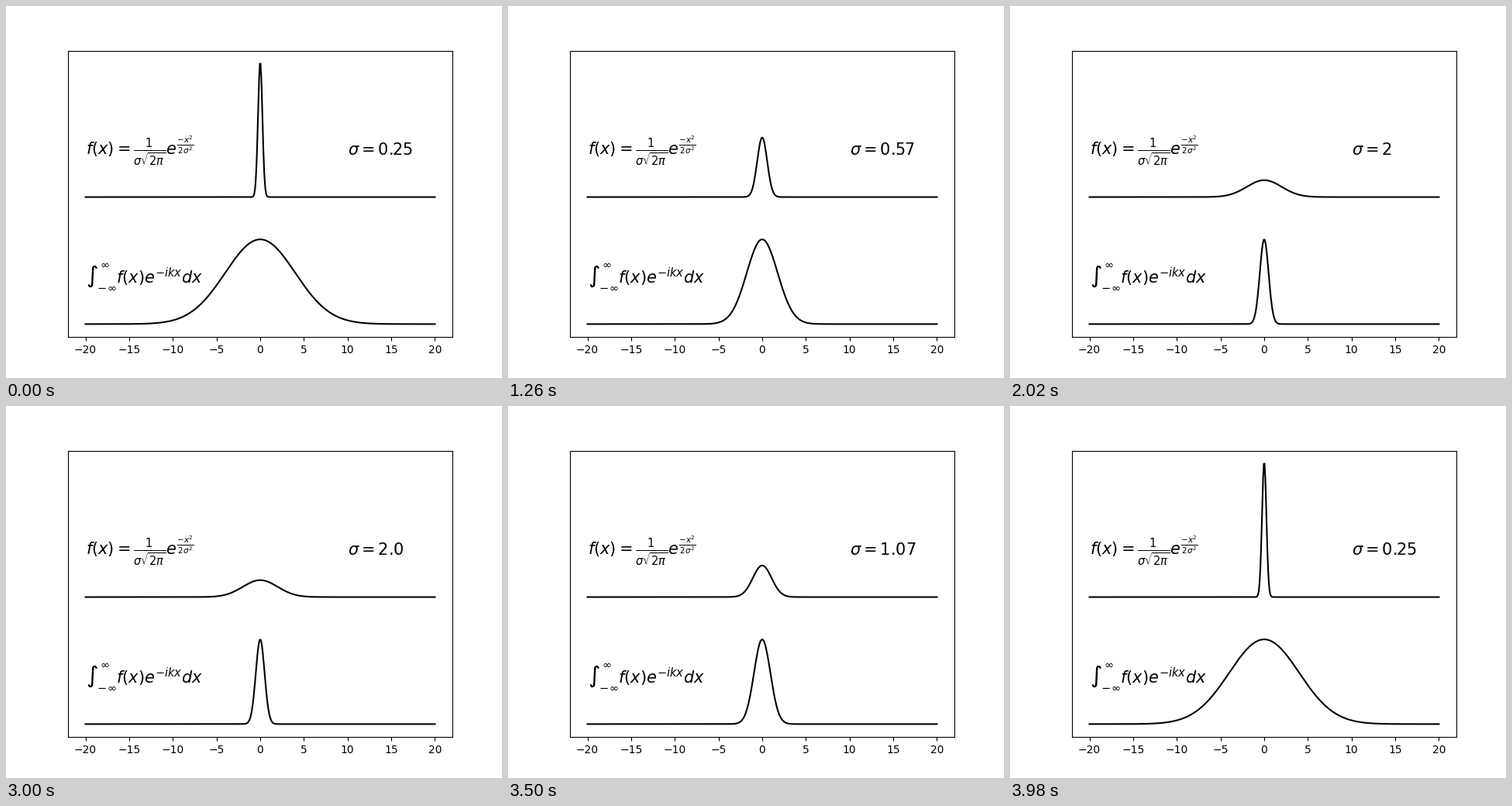
Write a matplotlib script that moves like this. It is 640 px wide and 480 px high and loops after 5000 ms.

```python
import numpy as np
import matplotlib.pyplot as plt
from matplotlib.animation import FuncAnimation

STEP_MS = 20
FRAMES = 250
EASE = 50           # frames per transition
NARROW, WIDE = 0.25, 2
OFFSET = 1.5        # height of the upper baseline

x = np.linspace(-20, 20, 500)


def gauss(sigma):
    return np.exp(-x**2 / (2 * sigma**2)) / (sigma * np.sqrt(2 * np.pi))


def transform(sigma):
    return np.exp(-(sigma * x)**2 / 2)


def ease(a, b, n):
    p = min(n / EASE, 1)
    return a + (b - a) * (1 - np.cos(np.pi * p)) / 2


def sigma_at(i):
    if i < 50:
        return NARROW
    if i <= 100:
        return float(ease(NARROW, WIDE, i - 49))
    if i < 150:
        return WIDE
    if i < 199:
        return float(ease(WIDE, NARROW, i - 149))
    return NARROW


def label(sigma):
    return rf"$\sigma={round(sigma, 2)}$"


fig, ax = plt.subplots(figsize=(6.4, 4.8), dpi=100)
upper, = ax.plot(x, gauss(NARROW) + OFFSET, "k")
lower, = ax.plot(x, transform(NARROW), "k")
ax.set_yticks([])
ax.set_xlim(-22, 22)
ax.set_ylim(ax.get_ylim())

ax.text(-20, 2, r"$f(x)=\frac{1}{\sigma\sqrt{2\pi}}e^{\frac{-x^2}{2\sigma^2}}$",
        fontsize=15)
ax.text(-20, 0.5, r"$\int_{-\infty}^{\infty}f(x)e^{-ikx}dx$", fontsize=15)
value = ax.text(10, 2, label(NARROW), fontsize=15)


def update(i):
    sigma = sigma_at(i)
    upper.set_ydata(gauss(sigma) + OFFSET)
    lower.set_ydata(transform(sigma))
    value.set_text(label(sigma))
    return upper, lower, value


anim = FuncAnimation(fig, update, frames=FRAMES, interval=STEP_MS, repeat=True)
plt.show()
```
